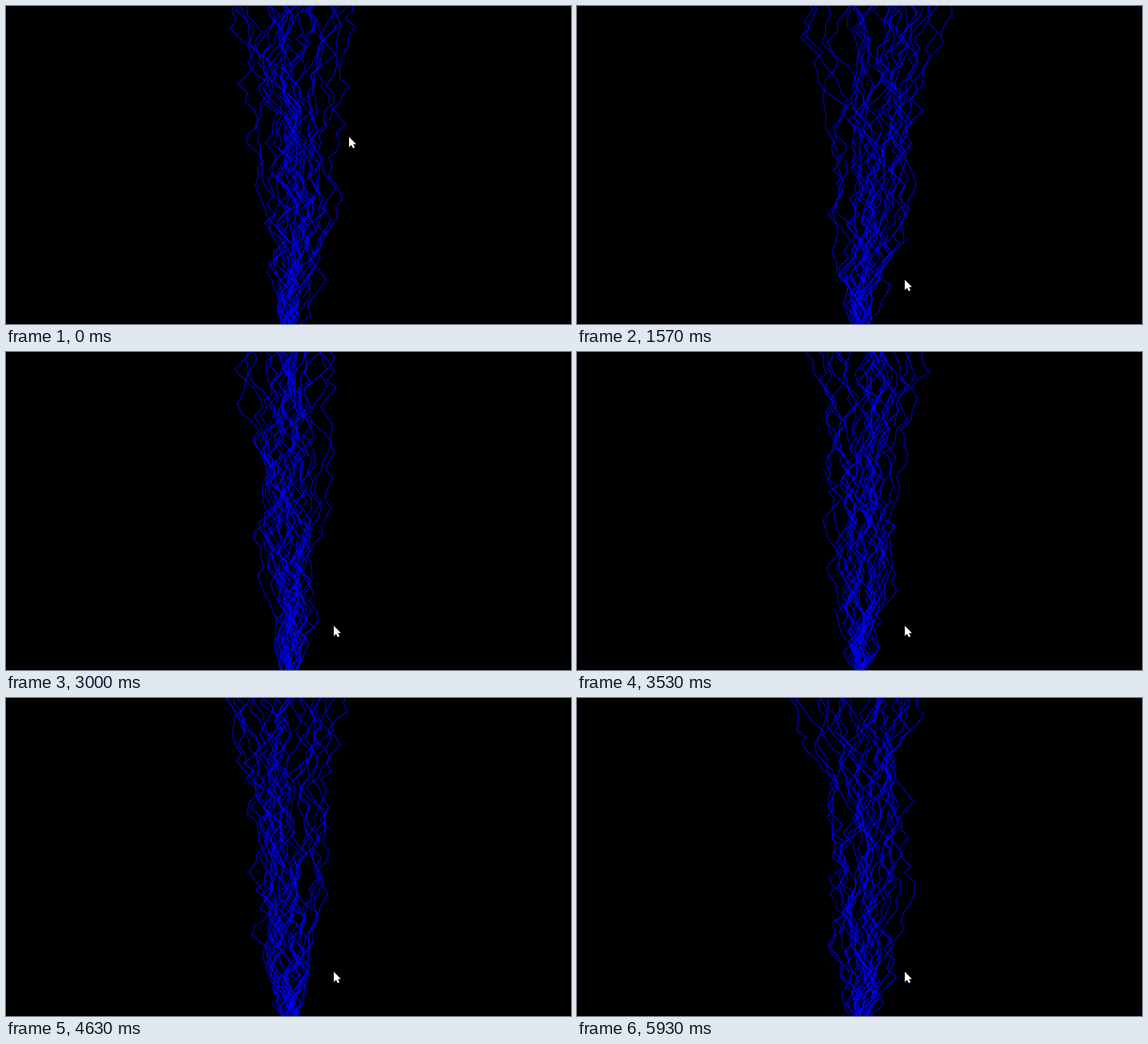
Animation of 998x561 px, one loop 5.96 s. Source, as an HTML page:

```html
<!DOCTYPE html>
<html lang="en">
<head>
<meta charset="utf-8">
<title>Lightning</title>
<style>
  html, body { margin: 0; width: 100%; height: 100%; overflow: hidden; background: #000; }
  svg { display: block; width: 998px; height: 561px; }
  #sky path { fill: none; stroke: #00f; stroke-opacity: .76; stroke-width: 1.8; stroke-linejoin: round; }
</style>
</head>
<body>
<svg viewBox="0 0 998 561">
  <rect width="998" height="561"/>
  <g id="sky"></g>
  <path id="cursor" fill="#fff" d="M0 0V18L4 14.3L7 20L10 18.6L7.4 12.8H12.6Z"/>
</svg>
<script>
const LOOP = 5960, BOLTS = 24, ROOT_X = 500, ROOT_Y = 572;
const sky = document.getElementById('sky');
const cursor = document.getElementById('cursor');

// Each strike fans out to these x positions at mid height and at the top.
const strikes = [
  { start: 0, mid: [428, 600], top: [378, 614] },
  { start: 1130, top: [391, 688] },
  { start: 1870, top: [374, 640] },
  { start: 2070, mid: [426, 553], top: [418, 598] },
  { start: 2500, top: [378, 609] },
  { start: 2870, mid: [430, 580], top: [402, 602] },
  { start: 3200, top: [351, 665] },
  { start: 3530, top: [385, 640] },
  { start: 3730, top: [360, 707] },
  { start: 3930, mid: [396, 578], top: [400, 625] },
  { start: 4400, top: [351, 630] },
  { start: 4870, top: [390, 651] },
  { start: 5070, mid: [430, 566], top: [374, 590] },
  { start: 5500, top: [372, 710] },
  { start: 5770, mid: [418, 610], top: [378, 612] }
];

function seeded(seed) {
  return () => {
    seed = (seed + 0x6D2B79F5) | 0;
    let n = Math.imul(seed ^ (seed >>> 15), 1 | seed);
    n = (n + Math.imul(n ^ (n >>> 7), 61 | n)) ^ n;
    return ((n ^ (n >>> 14)) >>> 0) / 4294967296;
  };
}

const mix = (a, b, k) => a + (b - a) * k;
const smooth = k => k * k * (3 - 2 * k);
const clamp = (v, lo, hi) => Math.min(hi, Math.max(lo, v));

// Edge of the fan at height h (0 at the root, 1 at the top).
function edge(h, mid, top) {
  const reach = top - ROOT_X, half = (mid - ROOT_X) * Math.SQRT2;
  return ROOT_X + Math.sqrt(h) * mix(2 * half - reach, reach, h);
}

// Evenly spread lanes from -1 to 1 in random order, denser in the centre.
function lanes(random) {
  const list = Array.from({ length: BOLTS }, (_, i) => {
    const v = 2 * i / (BOLTS - 1) - 1;
    return Math.sign(v) * Math.abs(v) ** 1.3;
  });
  for (let i = BOLTS - 1; i > 0; i--) {
    const j = Math.floor(random() * (i + 1));
    [list[i], list[j]] = [list[j], list[i]];
  }
  return list;
}

// Jagged climb that is gently drawn from its low lane to its high lane.
function bolt(random, low, high, mid, top) {
  let x = ROOT_X + low * 8, y = ROOT_Y;
  let d = `M${x} ${y}`;
  while (y > 0) {
    y -= mix(11, 20, random());
    const h = clamp(1 - y / ROOT_Y, 0, 1);
    const left = edge(h, mid[0], top[0]), right = edge(h, mid[1], top[1]);
    const goal = mix(left, right, (1 + mix(low, high, smooth(h))) / 2);
    const step = mix(-17, 17, random());
    const next = x + step + (goal - x) * .12;
    x = next < left - 4 || next > right + 4 ? x - step : next;
    x = clamp(x, left - 6, right + 6);
    d += `L${x.toFixed(1)} ${y.toFixed(1)}`;
  }
  return d;
}

function drawStrike({ mid, top }, seed) {
  const random = seeded(seed + 1);
  const low = lanes(random), high = lanes(random);
  const spread = mid || top.map(x => mix(ROOT_X, x, .65));
  const group = document.createElementNS(sky.namespaceURI, 'g');
  for (let i = 0; i < BOLTS; i++) {
    const path = document.createElementNS(sky.namespaceURI, 'path');
    path.setAttribute('d', bolt(random, low[i], high[i], spread, top));
    group.append(path);
  }
  sky.append(group);
  return group;
}

const groups = strikes.map(drawStrike);

function render(t) {
  const current = strikes.findLastIndex(s => t >= s.start);
  groups.forEach((group, i) => { group.style.display = i === current ? '' : 'none'; });

  // The pointer glides down, then settles a little to the right.
  const fall = smooth(clamp((t - 200) / 770, 0, 1));
  const settle = smooth(clamp((t - 970) / 150, 0, 1));
  const x = Math.round(606 - 40 * fall + 13 * settle);
  const y = Math.round(231 + 228 * fall + 24 * settle);
  cursor.setAttribute('transform', `translate(${x} ${y})`);
}

const begin = performance.now();
function tick() {
  render((performance.now() - begin) % LOOP);
  requestAnimationFrame(tick);
}
tick();
</script>
</body>
</html>
```
